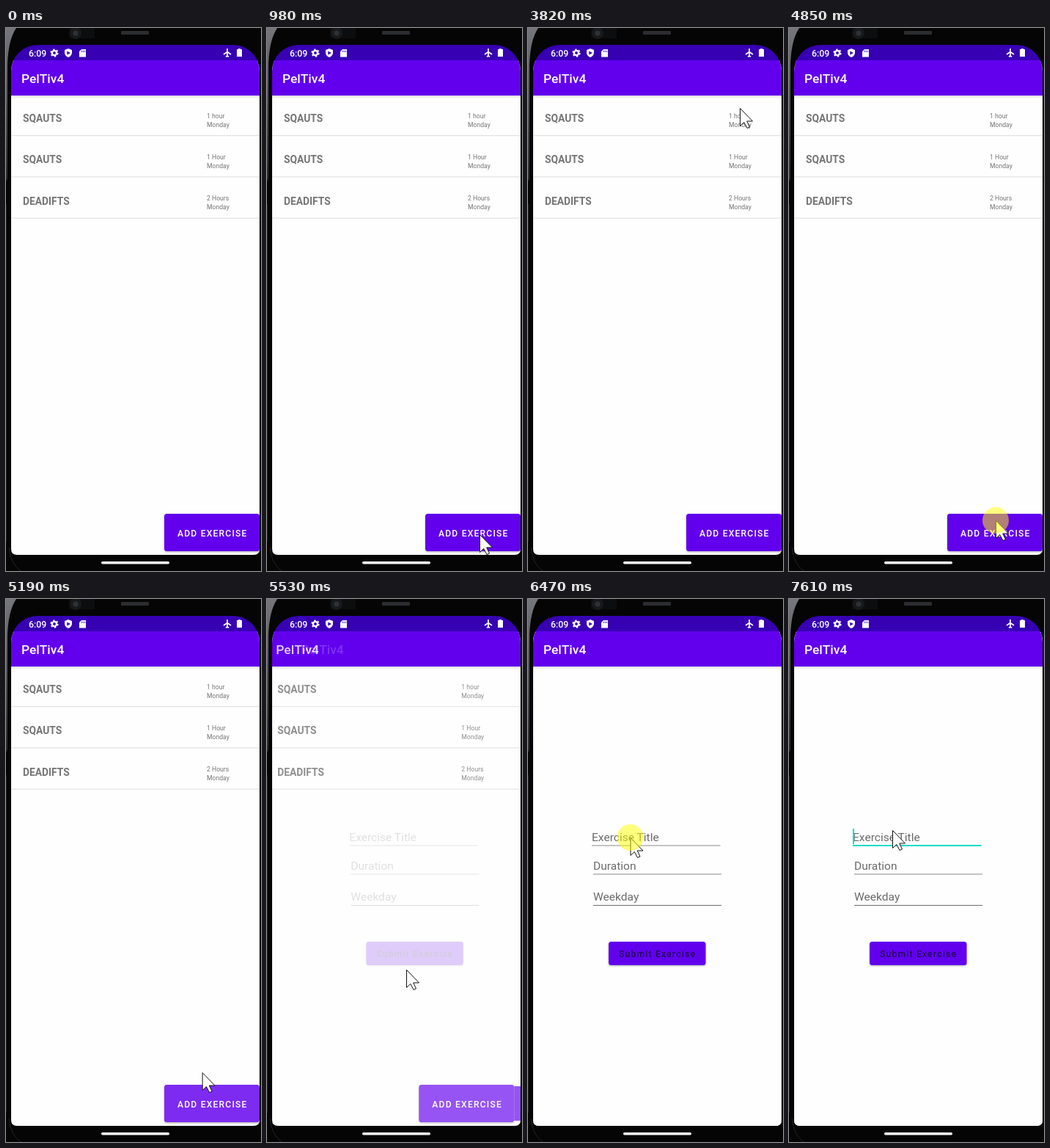
Recreate the animation shown at these times as an HTML page. Size 348x740 px, loop 8000 ms.

```html
<!DOCTYPE html>
<html lang="en">
<head>
<meta charset="utf-8">
<title>Workout list</title>
<style>
html, body { margin: 0; width: 100%; height: 100%; overflow: hidden; background: #050506; }
svg { display: block; width: 348px; height: 740px; font-family: Roboto, sans-serif; }
.bar { font: 500 17.4px Roboto, sans-serif; fill: #fff; }
.item { font-weight: 700; font-size: 13.8px; fill: #757575; }
.note { font-size: 8.65px; fill: #757575; }
.hint { font-size: 15.55px; fill: #6a6a6a; }
.btn { font: 500 12.1px Roboto, sans-serif; letter-spacing: 1.2px; }
</style>
</head>
<body>
<svg viewBox="0 0 348 740">
  <defs>
    <clipPath id="screen"><path d="M7 710V59A36 36 0 0 1 43 23H310A36 36 0 0 1 346 59V710Q346 718 338 718H15Q7 718 7 710Z"/></clipPath>
    <linearGradient id="fade" x2="0" y2="1">
      <stop stop-color="#000" stop-opacity=".14"/><stop offset="1" stop-color="#000" stop-opacity="0"/>
    </linearGradient>
    <linearGradient id="rim" x2="0" y2="1">
      <stop stop-color="#75777c"/><stop offset="1" stop-color="#26282c"/>
    </linearGradient>
    <filter id="lift" x="-10%" y="-20%" width="120%" height="150%">
      <feDropShadow dx="0" dy="1.2" stdDeviation=".8" flood-opacity=".3"/>
    </filter>
    <!-- parts shared by both pages -->
    <g id="page">
      <rect x="-40" y="44" width="430" height="674" fill="#fefefe"/>
      <rect x="-40" y="92" width="430" height="4" fill="url(#fade)"/>
      <rect x="-40" y="44" width="430" height="48" fill="#6200ee"/>
      <text class="bar" x="21" y="75">PelTiv4</text>
    </g>
  </defs>

  <!-- phone body -->
  <rect width="348" height="740" fill="#050506"/>
  <path d="M0 0H14Q3 16 2 50V205L0 210Z" fill="url(#rim)"/>
  <path d="M.5 240V700" stroke="#1b1d22"/>
  <path d="M4 708Q6 730 20 740" fill="none" stroke="#22242a"/>
  <rect x="86" width="35" height="14" fill="#0c0d0e"/>
  <circle cx="95" cy="7" r="8" fill="#17191b"/>
  <circle cx="95" cy="7" r="3.5" fill="#2e3236"/>
  <rect x="157" y="4" width="38" height="5" rx="1" fill="#2c2d30"/>
  <rect x="130" y="727" width="93" height="3.4" rx="1.7" fill="#fff"/>

  <g clip-path="url(#screen)">
    <g id="list">
      <use href="#page"/>
      <g id="rows"></g>
      <rect x="346" y="664" width="40" height="47" fill="#6200ee"/>
      <rect x="216" y="662" width="130" height="51" rx="3.5" fill="#6200ee" filter="url(#lift)"/>
      <rect id="ripple" x="216" y="662" width="170" height="51" rx="3.5" fill="#fff"/>
      <text class="btn" x="234" y="692.5" fill="#fff">ADD EXERCISE</text>
    </g>
    <g id="form">
      <use href="#page"/>
      <text class="hint" x="87" y="329.5">Exercise Title</text>
      <text class="hint" x="89" y="368.5">Duration</text>
      <text class="hint" x="89" y="411">Weekday</text>
      <path id="line" d="M87 336H262.5"/>
      <path d="M89 375H264" stroke="#8a8a8a"/>
      <path d="M89 417.5H264" stroke="#6e6e6e"/>
      <rect id="caret" x="87" y="313" width="2" height="21" fill="#03dac5"/>
      <rect x="110" y="467" width="132.5" height="32" rx="3.5" fill="#6200ee" filter="url(#lift)"/>
      <text class="btn" x="124" y="488" fill="#240058">Submit Exercise</text>
    </g>

    <!-- status bar -->
    <rect y="23" width="348" height="21" fill="#3700b3"/>
    <g fill="#fff">
      <text x="31" y="38.5" font-size="12.3" font-weight="500">6:09</text>
      <circle cx="66" cy="34" r="3.1" fill="none" stroke="#fff" stroke-width="2.4"/>
      <circle cx="66" cy="34" r="4.8" fill="none" stroke="#fff" stroke-width="1.6" stroke-dasharray="2.5 2.527"/>
      <path d="M85 28L90 30V34Q89.500 38 85 40Q80.500 38 80 34V30Z"/>
      <path d="M83.300 31.500L88 34L83.300 36.500Z" fill="#3700b3"/>
      <path d="M103 29H109V39.500H100V32Z"/>
      <path d="M103.500 30.500V33M105.500 30.500V33M107.500 30.500V33" stroke="#3700b3" stroke-width=".8"/>
      <path d="M302 28V39M297 36L302 32.500L307 36M300 39.300L302 38L304 39.300" fill="none" stroke="#fff" stroke-width="1.700"/>
      <path d="M317 28H320V29H322V39H315V29H317Z"/>
    </g>
  </g>

  <g id="cursor">
    <path d="M.5 .5V24.500L5.800 19.500L10 27.500L13.500 26L9.700 18H17.500Z" fill="#fff" stroke="#111" stroke-linejoin="round"/>
    <circle id="press" r="18" fill="#ff0"/>
  </g>
</svg>
<script>
const $ = id => document.getElementById(id);
const LOOP = 8000, STEP = 67, OPEN = 5465, SLIDE = 34;

$('rows').innerHTML = [['SQAUTS', '1 hour'], ['SQAUTS', '1 Hour'], ['DEADIFTS', '2 Hours']]
  .map(([name, time], i) => `<g transform="translate(0 ${i * 56.2})">
    <text class="item" x="23" y="128.3">${name}</text>
    <text class="note" x="274" y="123">${time}</text>
    <text class="note" x="274" y="135">Monday</text>
    <path d="M-40 146.7H390" stroke="#dcdcdc"/></g>`).join('');

// pointer moves: from a time on, reach x, y in some steps; null hides it
const moves = [
  { at: 0, to: null },
  { at: 370, to: [326, 515] },
  { at: 440, to: [326, 522] },
  { at: 700, to: [290, 690], steps: 5 },
  { at: 1380, to: [305, 539] },
  { at: 1450, to: null },
  { at: 1710, to: [317, 95] },
  { at: 1780, to: [261, 8], steps: 2 },
  { at: 1920, to: null },
  { at: 3820, to: [289, 109] },
  { at: 3890, to: [280, 667], steps: 7 },
  { at: 4710, to: [282, 671] },
  { at: 5060, to: [190, 505], steps: 8 },
  { at: 5590, to: [155.5, 261], steps: 4 },
  { at: 6060, to: [139.5, 325], steps: 5 },
  { at: 6810, to: [141, 315], steps: 3 }
];

const within = (t, a, b) => t >= a && t < b;
const clamp = v => Math.max(0, Math.min(1, v));
const smooth = v => v * v * (3 - 2 * v);
const bezier = (s, a, b, c, d) =>
  a * (1 - s) ** 3 + 3 * b * s * (1 - s) ** 2 + 3 * c * s * s * (1 - s) + d * s ** 3;

// quick start with a long, slow settle
function settle(u) {
  const [xs, ys] = u < 1 / 6
    ? [[0, .05, .1333, 1 / 6], [0, 0, .06, .4]]
    : [[1 / 6, .2083, .25, 1], [.4, .82, 1, 1]];
  let lo = 0, hi = 1;
  for (let i = 0; i < 20; i++) {
    const mid = (lo + hi) / 2;
    if (bezier(mid, ...xs) < u) lo = mid; else hi = mid;
  }
  return bezier(lo, ...ys);
}

function pointer(t) {
  const i = moves.findLastIndex(m => m.at <= t);
  const { at, to, steps = 1 } = moves[i];
  if (!to || steps === 1) return to;
  const from = moves[i - 1].to;
  const p = smooth(clamp((Math.floor((t - at) / STEP) + 1) / steps));
  return from.map((v, k) => v + (to[k] - v) * p);
}

function set(id, attributes) {
  for (const [name, value] of Object.entries(attributes)) $(id).setAttribute(name, value);
}

function draw(t) {
  const age = Math.max(0, Math.floor((t - OPEN + 1) / STEP) * STEP - 1);
  const p = age > 390 ? 1 : settle(age / 450);
  set('list', { transform: `translate(${-SLIDE * p} 0)` });
  set('form', { transform: `translate(${SLIDE * (1 - p)} 0)`, opacity: clamp((age - 50) / 83) });
  set('ripple', { opacity: .17 * clamp((t - 4990) / 200) });

  const focus = t >= 6540;
  set('line', { stroke: focus ? '#03dac5' : '#8a8a8a', 'stroke-width': focus ? 2 : 1 });
  set('caret', { opacity: within(t, 6540, 7080) || t >= 7610 ? 1 : 0 });

  const tip = pointer(t);
  set('cursor', { visibility: tip ? 'visible' : 'hidden', transform: `translate(${tip || '0 0'})` });
  set('press', { opacity: within(t, 4710, 4990) || within(t, 6400, 6540) ? .5 : 0 });
}

const start = performance.now();
function tick() {
  draw((performance.now() - start) % LOOP);
  requestAnimationFrame(tick);
}
tick();
</script>
</body>
</html>
```
